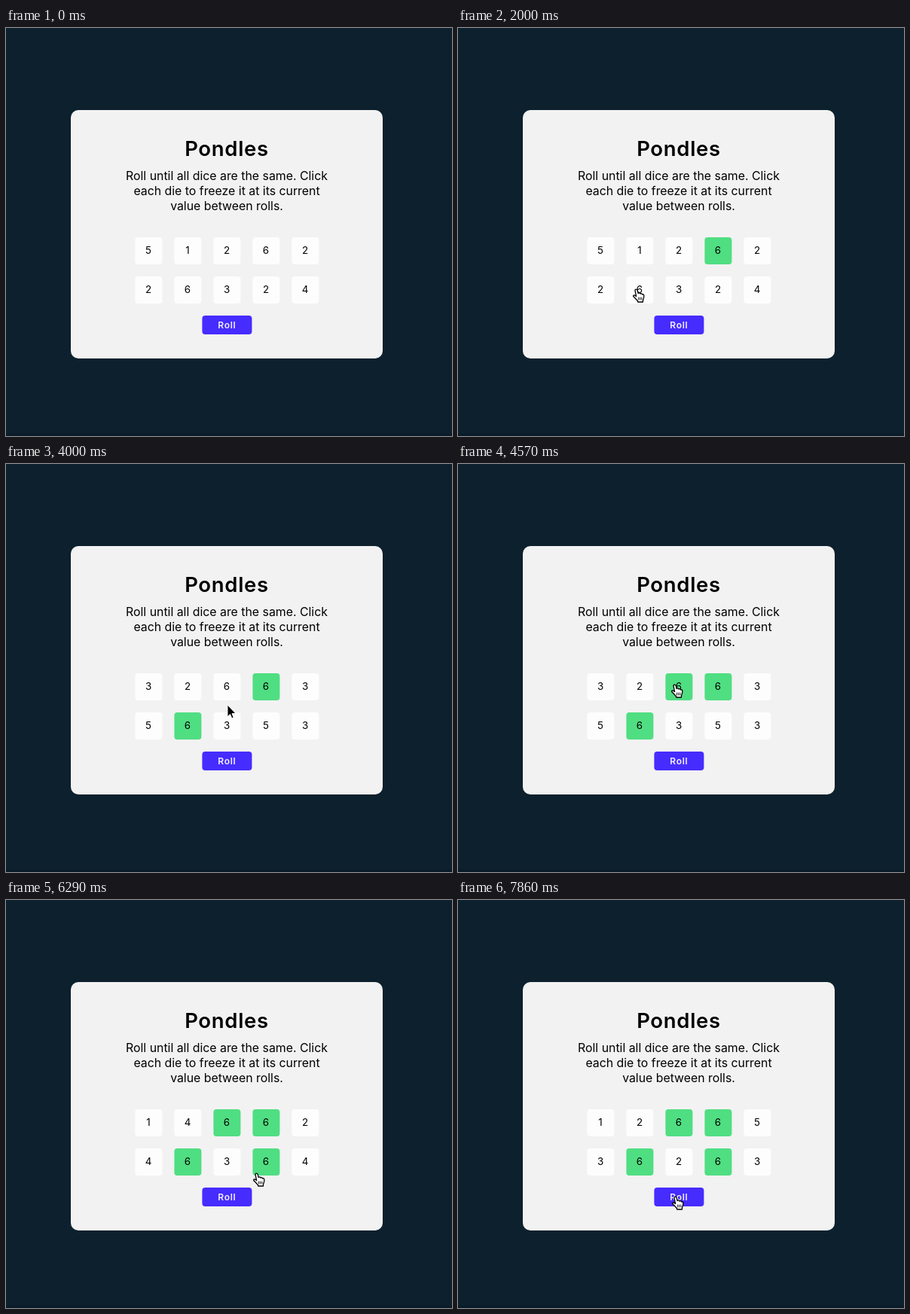
An HTML page for the animation above (8000 ms loop, 592 by 542 pixels).

```html
<!DOCTYPE html>
<html lang="en">
<head>
<meta charset="utf-8">
<title>Dice game</title>
<style>
  html, body { margin: 0; width: 100%; height: 100%; overflow: hidden; background: #0c202d; }
  svg { display: block; width: 592px; height: 542px; }
  text { font-family: Inter, "Liberation Sans", sans-serif; text-anchor: middle; }
  .title { font-size: 27.5px; font-weight: 600; letter-spacing: .7px; }
  .rules { font-size: 15.85px; }
  .digit { font-size: 13.33px; }
  .label { font-size: 12px; font-weight: 600; letter-spacing: .7px; fill: #f4f2ff; }
</style>
</head>
<body>
<svg viewBox="0 0 592 542">
  <rect width="592" height="542" fill="#0c202d"/>
  <rect y="539" width="592" height="3" fill="#091b27"/>
  <rect x="86" y="109" width="414" height="330" rx="10" fill="#f2f2f2"/>
  <text class="title" x="293" y="170">Pondles</text>
  <g class="rules">
    <text x="293" y="202">Roll until all dice are the same. Click</text>
    <text x="293" y="222">each die to freeze it at its current</text>
    <text x="293" y="242">value between rolls.</text>
  </g>
  <g id="dice"></g>
  <rect x="260.4" y="382" width="66" height="25" rx="4" fill="#462cff"/>
  <text class="label" x="293.4" y="399">Roll</text>
  <g id="cursor" stroke-linejoin="round" stroke-linecap="round">
    <g id="hand" stroke="#000" stroke-width="1.3">
      <path fill="#fff" d="M-2 1.5C-2 -.3 .6 -.3 1.1 1.3L2.2 5.6C2.6 4.5 4.6 4.5 5 6.2C5.6 5.2 7.2 5.4 7.5 7C8.4 6.2 9.8 6.9 9.8 8.6C10 11.5 9.2 12.5 8.6 14.2L8.4 17H1.8L1.4 15.5C0 13.8 -2.5 11.5 -4 9.8C-5 8.4 -3.3 7.2 -1.8 8.4L-.4 9.6Z"/>
      <path fill="none" stroke-width=".9" d="M2.6 11v3M4.7 11v3M6.8 11v3"/>
    </g>
    <path id="arrow" fill="#000" stroke="#fff" d="M0 0V15.5L3.5 12.2L5.8 17.5L8.2 16.5L6 11.3H10.8Z"/>
  </g>
</svg>
<script>
const LOOP = 8000, STEPS = 56, CLICK_DELAY = 2;
const byId = id => document.getElementById(id);

// Dice shown after each roll
const rolls = ['5126226324', '3266356353', '1466246364', '1266536263'];

// Where the pointer rests; it clicks whatever lies under it
const stops = [
  { arrive: 8, leave: 9, x: 344, y: 291 },
  { arrive: 14, leave: 17, x: 237, y: 347 },
  { arrive: 22, leave: 26, x: 311, y: 398 },
  { arrive: 29, leave: 32, x: 288, y: 293 },
  { arrive: 35, leave: 37, x: 296, y: 403 },
  { arrive: 39, leave: 44, x: 333, y: 363 },
  { arrive: 46, leave: STEPS, x: 289, y: 394 }
];
const entry = { leave: 1, x: 362, y: 500 };

function add(parent, tag, attrs) {
  const el = document.createElementNS('http://www.w3.org/2000/svg', tag);
  for (const key in attrs) el.setAttribute(key, attrs[key]);
  return parent.appendChild(el);
}

const dice = Array.from({ length: 10 }, (_, i) => {
  const x = 171.4 + i % 5 * 52, y = 278 + Math.floor(i / 5) * 52;
  const face = add(byId('dice'), 'rect', { x, y, width: 36, height: 36, rx: 4 });
  const digit = add(byId('dice'), 'text', { class: 'digit', x: x + 17.6, y: y + 22.4 });
  return { x, y, w: 36, h: 36, face, digit };
});
const button = { x: 260, y: 382, w: 66, h: 25 };

const hit = (p, box) =>
  p.x >= box.x && p.x < box.x + box.w && p.y >= box.y && p.y < box.y + box.h;

function pointerAt(step) {
  let from = entry;
  for (const to of stops) {
    if (step < to.arrive) {
      const u = Math.max(0, (step - from.leave) / (to.arrive - from.leave));
      const ease = u * u * (3 - 2 * u);
      return { x: from.x + (to.x - from.x) * ease, y: from.y + (to.y - from.y) * ease };
    }
    if (step <= to.leave) return to;
    from = to;
  }
}

function render(time) {
  const step = Math.floor((time % LOOP + 5) / LOOP * STEPS) % STEPS;
  const clicks = stops.filter(s => step >= s.arrive + CLICK_DELAY);
  const values = rolls[clicks.filter(c => hit(c, button)).length];
  dice.forEach((die, i) => {
    const frozen = clicks.some(c => hit(c, die));
    die.digit.textContent = values[i];
    die.face.setAttribute('fill', frozen ? '#50de82' : '#fdfdfd');
  });

  const tip = pointerAt(step);
  const clickable = [button, ...dice].some(box => hit(tip, box));
  byId('cursor').setAttribute('transform', `translate(${tip.x} ${tip.y})`);
  byId('cursor').setAttribute('visibility', step ? 'visible' : 'hidden');
  byId('hand').setAttribute('display', clickable ? 'inline' : 'none');
  byId('arrow').setAttribute('display', clickable ? 'none' : 'inline');
}

const start = performance.now();
function tick() {
  render(performance.now() - start);
  requestAnimationFrame(tick);
}
tick();
</script>
</body>
</html>
```
